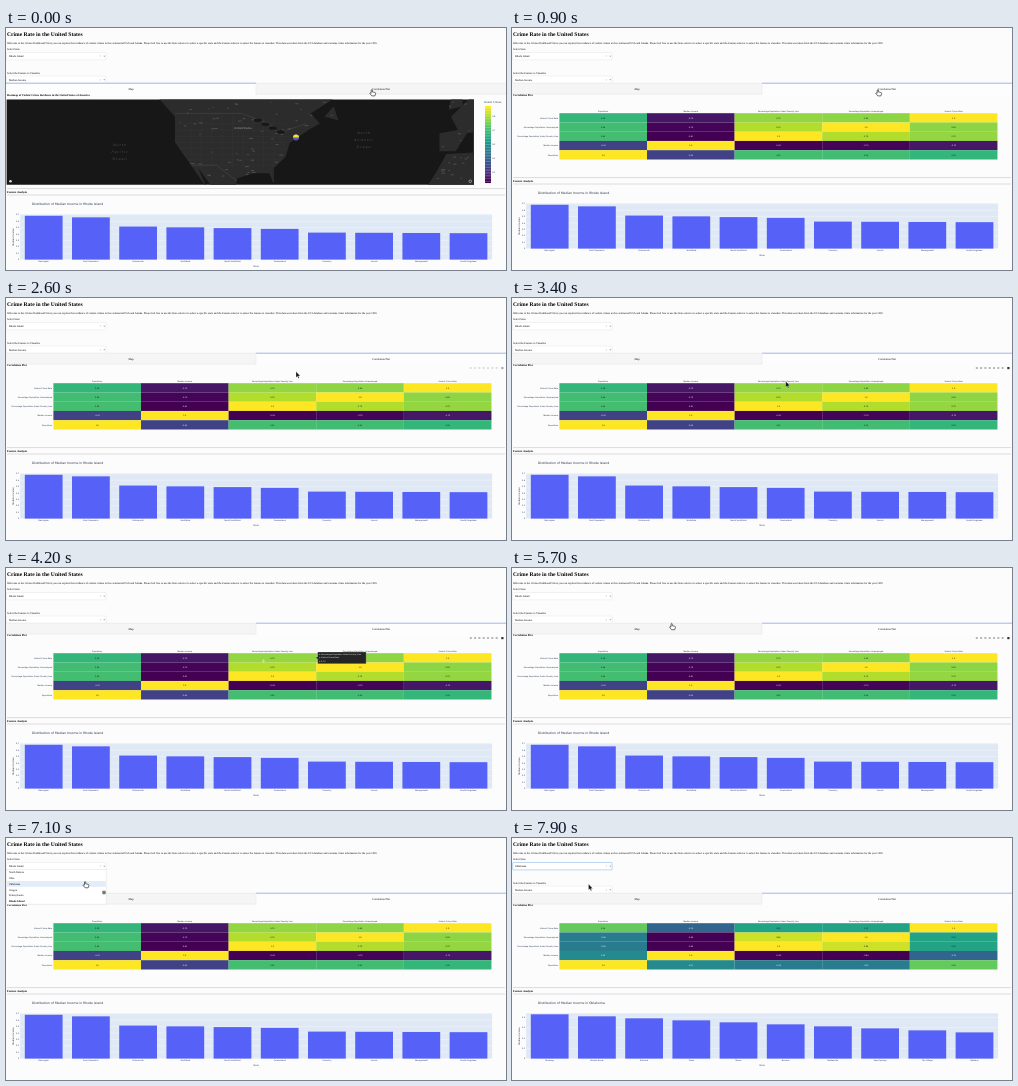
These frames come from a looping animation (500x242 px, 8000 ms). An HTML page:

```html
<!DOCTYPE html>
<html lang="en">
<head>
<meta charset="utf-8">
<title>Crime dashboard</title>
<style>
  html, body { margin: 0; width: 100%; height: 100%; overflow: hidden; background: #fcfcfc; }
  svg { display: block; width: 100vw; height: 100vh; text-rendering: geometricPrecision; }
  .serif { font-family: "Liberation Serif", serif; }
  .sans { font-family: "DejaVu Sans", sans-serif; }
</style>
</head>
<body>
<svg id="stage" viewBox="0 0 500 242"></svg>
<script>
const LOOP = 8000;
const INK = '#1f2d47';
const MID = 'text-anchor="middle"', END = 'text-anchor="end"', BOLD = 'font-weight="bold"';
const stage = document.getElementById('stage');

// Markup helpers; text is placed by its vertical middle.
const text = (s, x, y, size, family, attrs = '') =>
  `<text class="${family}" x="${x}" y="${y + size * 0.35}" font-size="${size}" ${attrs}>${s}</text>`;
const serif = (s, x, y, size = 2.73, attrs) => text(s, x, y, size, 'serif', attrs);
const sans = (s, x, y, size = 1.95, attrs) => text(s, x, y, size, 'sans', attrs);
const heading = (s, y) => serif(s, 1, y, 2.84, BOLD);
const rect = (x, y, w, h, fill, attrs = '') =>
  `<rect x="${x}" y="${y}" width="${w}" height="${h}" fill="${fill}" ${attrs}/>`;
const line = (x1, y1, x2, y2, color, width = 0.4) =>
  `<path d="M${x1} ${y1}L${x2} ${y2}" stroke="${color}" stroke-width="${width}"/>`;
const group = (id, body, attrs = '') => `<g id="${id}" ${attrs}>${body}</g>`;
const repeat = (n, draw) => Array.from({ length: n }, (_, i) => draw(i)).join('');
const clamp = v => Math.min(Math.max(v, 0), 1);

const viridisStops = ['440154', '482878', '3e4989', '31688e', '26828e', '1f9e89', '35b779', '6ece58', 'b5de2b', 'fde725'];
function viridis(t) {
  const p = clamp(t) * 9, i = Math.min(Math.floor(p), 8);
  const channel = (hex, k) => parseInt(hex.substr(k * 2, 2), 16);
  return `rgb(${[0, 1, 2].map(k => {
    const a = channel(viridisStops[i], k), b = channel(viridisStops[i + 1], k);
    return Math.round(a + (b - a) * (p - i));
  })})`;
}

const features = ['Population', 'Median Income', 'Percentage Population Under Poverty Line',
  'Percentage Population Unemployed', 'Violent Crime Rate'];
// "hardship" holds each feature's loading on one shared factor; "urban" links population and crime.
const states = {
  'Rhode Island': {
    hardship: [0.5, -0.9, 0.9, 0.88, 0.78], urban: 0,
    cities: ['Barrington', 'East Greenwich', 'Portsmouth', 'Smithfield', 'North Smithfield',
      'Cumberland', 'Coventry', 'Lincoln', 'Narragansett', 'South Kingstown'],
    income: i => i < 2 ? 0.685 - 0.025 * i : i < 6 ? 0.54 - 0.012 * i : 0.44 - 0.003 * i,
    unit: 64, ticks: 7
  },
  'Oklahoma': {
    hardship: [-0.06, -0.9, 0.93, 0.93, 0.25], urban: 0.58,
    cities: ['Mustang', 'Broken Arrow', 'Edmond', 'Yukon', 'Moore',
      'Norman', 'Bartlesville', 'Sand Springs', 'The Village', 'Bethany'],
    income: i => 0.43 - 0.0195 * i,
    unit: 103, ticks: 4
  }
};
function correlation(state, a, b) {
  const { hardship, urban } = states[state];
  return a === b ? 1 : hardship[a] * hardship[b] + (a + b === 4 && a * b === 0 ? urban : 0);
}

const GRID = { x: 47.4, y: 85.2, w: 87.6, h: 9.25 };
function heatmap(state) {
  return repeat(5, i => {
    const y = GRID.y + i * GRID.h, cx = GRID.x + (i + 0.5) * GRID.w;
    return sans(features[i], cx, 83.2, 1.95, `${MID} fill="${INK}"`) +
      sans(features[4 - i], 46.2, y + GRID.h / 2, 1.95, `${END} fill="${INK}"`) +
      repeat(5, j => {
        const v = correlation(state, 4 - i, j), x = GRID.x + j * GRID.w;
        return rect(x, y, GRID.w + 0.05, GRID.h + 0.05, viridis((v + 0.81) / 1.81)) +
          sans(v === 1 ? '1.0' : v.toFixed(2), x + GRID.w / 2, y + GRID.h / 2, 1.95,
            `${MID} fill="${v < 0.1 ? '#fff' : '#111'}"`);
      });
  });
}

function barChart(state) {
  const { cities, income, unit, ticks } = states[state];
  const left = 14.1, step = 47.2, base = 220.6;
  return sans(`Distribution of Median Income in ${state}`, 26, 165.4, 3.08, `fill="${INK}"`) +
    rect(left, 175.3, step * 10, base - 175.3, '#dfe8f5') +
    repeat(ticks + 1, k => {
      const y = base - k * 0.1 * unit;
      return line(left, y, left + step * 10, y, '#fff', 0.3) +
        sans((k / 10).toString(), 13.2, y, 1.95, `${END} fill="${INK}"`);
    }) +
    cities.map((city, i) => {
      const h = income(i) * unit;
      return rect(left + step * (i + 0.1), base - h, step * 0.8, h, '#5561f7') +
        sans(city, left + step * (i + 0.5), 222.7, 1.95, `${MID} fill="${INK}"`);
    }).join('') +
    sans('State', 250, 227, 2.1, `${MID} fill="${INK}"`) +
    sans('Median Income', 0, 0, 2.3, `${MID} fill="${INK}" transform="translate(7.5 198) rotate(-90)"`);
}

// Rough coastlines as longitude,latitude pairs, projected with Mercator around the marker.
const MARK = { x: 290, y: 109.6, lon: -71.4, lat: 41.6, scale: 2.3 };
const mercator = lat => Math.log(Math.tan(Math.PI / 4 + lat * Math.PI / 360)) * 180 / Math.PI;
const project = (lon, lat) => [MARK.x + MARK.scale * (lon - MARK.lon),
  MARK.y - MARK.scale * (mercator(lat) - mercator(MARK.lat))];
const trace = coast => 'M' + coast.split(' ').map(p => project(...p.split(',').map(Number)).map(v => v.toFixed(1)).join(' ')).join('L');
const coasts = [
  '-131,53 -124,48 -124,40 -117,32 -110,23 -114,31 -105,20 -98,20 -97,27 -90,29 -83,29 -81,25 -81,31 -76,35 -74,40 -70,42 -66,44 -61,46 -65,49 -55,53',
  '-59,48 -53,47 -55,51',
  '-9,43 -1,44 -4,48 4,53 14,54 14,44 3,43 -2,37 -9,37',
  '-5,50 1,51 1,53 -4,53',
  '-6,36 14,37 14,20 -17,20 -10,30'
];
function mapView() {
  let seed = 7;
  const random = () => (seed = seed * 16807 % 2147483647) / 2147483647;
  const coastPath = coasts.map(c => trace(c) + 'Z').join('');
  const label = (word, x, y) => sans(word, x, y, 3.3, `${MID} font-style="italic" letter-spacing=".9" fill="#505050"`);
  const ocean = (name, x, y) => ['North', name, 'Ocean'].map((word, i) => label(word, x, y + i * 6.8)).join('');
  const stateLines = repeat(9, i => {
    const lon = -117 + i * 4.5, lat = 32 + i * 2;
    return trace(`${lon},31 ${lon},48.5`) + (i < 8 ? trace(`-123,${lat} -76,${lat}`) : '');
  }).replace(/,/g, '');
  const towns = repeat(170, () => {
    const x = 170 + random() * 300, y = 74 + random() * 80;
    return `M${x} ${y}h${1 + random() * 3}`;
  });
  return `<clipPath id="frame">${rect(0.6, 71.5, 467.3, 85.3, '#000')}</clipPath>` +
    `<clipPath id="coast"><path d="${coastPath}"/></clipPath><g clip-path="url(#frame)">` +
    rect(0, 71, 468, 86, '#171717') + `<path d="${coastPath}" fill="#2c2c2c"/>` +
    `<g clip-path="url(#coast)" fill="none"><path d="${stateLines}" stroke="#3c3c3c" stroke-width=".3"/>` +
    `<path d="${towns}" stroke="#6c6c6c" stroke-width=".5"/>` +
    `<path d="${trace('-124,49 -95,49 -83,46 -79,43 -67,46')}${trace('-117,32 -106,32 -97,26')}" stroke="#555" stroke-width=".4"/></g>` +
    repeat(4, i => {
      const [x, y] = project(-88 + i * 3.3, 47 - i * 1.2);
      return `<ellipse cx="${x}" cy="${y}" rx="4" ry="1.7" fill="#171717"/>`;
    }) +
    ocean('Pacific', 114, 117) + ocean('Atlantic', 358, 105) +
    sans('United States', 237, 100, 2.6, `${MID} fill="#aaa"`) +
    '<circle cx="4.5" cy="153.3" r="1.3" fill="#ddd"/><circle cx="464.3" cy="153.3" r="1.3" fill="none" stroke="#ccc" stroke-width=".6"/></g>' +
    `<g transform="translate(${MARK.x} ${MARK.y})"><circle r="3" fill="#5a55b4"/><path d="M-3 0a3 3 0 0 1 6 0z" fill="#f4e32a"/></g>` +
    repeat(50, i => rect(479, 78 + i * 1.54, 6, 1.6, viridis(1 - i / 49))) +
    repeat(5, i => sans((0.8 - i * 0.15).toFixed(1), 486.2, 88 + i * 14, 1.95, `fill="${INK}"`)) +
    sans('Violent Crimes', 478, 74.6, 2.4, `fill="${INK}"`);
}

const control = (y, id) =>
  rect(0.6, y, 99.5, 7.4, '#fff', `id="${id}" stroke="#ddd" stroke-width=".4" rx=".6"`) +
  serif('×', 94.3, y + 3.7, 3.2, `${MID} fill="#888"`) +
  `<path d="M97.3 ${y + 3.3}h2l-1 1.2z" fill="#999"/>`;

const tabs = active => ['Map', 'Correlation Plot'].map((label, i) => {
  const x = i * 250, on = i === active;
  return rect(x, 55, 250, 11.2, on ? '#fdfdfd' : '#f5f5f5') +
    line(x, 55.2, x + 250, 55.2, on ? '#5f86e0' : '#ddd', on ? 0.6 : 0.4) +
    (on ? '' : line(x, 66.1, x + 250, 66.1, '#ddd')) +
    serif(label, x + 125, 60.7, 2.8, MID);
}).join('') + line(250, 55, 250, 66.2, '#ddd');

const options = ['North Dakota', 'Ohio', 'Oklahoma', 'Oregon', 'Pennsylvania', 'Rhode Island'];
const MENU = { y: 31.4, row: 5.8 };
const menu = rect(0.6, MENU.y, 99.5, 34.7, '#fff', 'stroke="#ddd" stroke-width=".4"') +
  rect(0.8, 0, 99.1, MENU.row, '#e3edfa', 'id="focusRow"') +
  options.map((o, i) => serif(o, 3, MENU.y + (i + 0.5) * MENU.row, 2.73, i === 5 ? BOLD : '')).join('') +
  '<circle cx="98" cy="54.5" r="1.9" fill="#7a7a7a"/>';

const icons = repeat(7, i => rect(463.8 + i * 4.3, 69.1, 2, 2, '#b4b4b4', 'rx=".5"')) + rect(495.3, 69, 2.2, 2.2, '#333');

stage.innerHTML =
  serif('Crime Rate in the United States', 1, 6.5, 5.57, BOLD) +
  serif('Welcome to the Crimes Dashboard! Here you can explore the incidence of violent crimes in the continental USA and Alaska. ' +
    'Please feel free to use the State selector to select a specific state and the Feature selector to select the feature to visualize. ' +
    'This data was taken from the UCI database and contains crime information for the year 1995', 1, 15.2) +
  serif('Select State', 1, 21) + control(24.5, 'stateBox') + group('stateName', '') +
  serif('Select the Feature to Visualize', 1, 45) + control(48, 'featureBox') + serif('Median Income', 3, 51.8) +
  group('mapTab', tabs(0) + heading('Heatmap of Violent Crime Incidence in the United States of America', 66.8) + mapView()) +
  group('plotTab', tabs(1) + heading('Correlation Plot', 66.8) + group('heat', '') + group('modebar', icons)) +
  group('analysis', line(1, 149.6, 499, 149.6, '#aaa') + line(1, 156, 499, 156, '#aaa') +
    heading('Feature Analysis', 152.6) + group('bars', '')) +
  group('tip', '') + group('menu', menu) +
  group('cursor',
    '<path id="arrow" d="M0 0V6L1.4 4.8 2.3 6.8 3.3 6.4 2.4 4.4H4.2Z" fill="#111" stroke="#fff" stroke-width=".3"/>' +
    '<path id="hand" d="M0 .5Q.6-.5 1.2 .5V2.4L3.9 3Q4.6 3.3 4.4 4.2L3.7 6.4H.6L-1.5 3.8Q-1.4 2.9 0 3.7Z" fill="#fff" stroke="#111" stroke-width=".6"/>' +
    '<path id="cross" d="M-2 0H2M0-2V2" stroke="#d8d8d8" stroke-width=".8"/>');

const el = {};
stage.querySelectorAll('[id]').forEach(node => el[node.id] = node);
const show = (node, on) => node.style.display = on ? '' : 'none';

// Each move eases the cursor to a new place between two times.
const moves = [
  { from: 1800, to: 2600, x: 290, y: 73.5 },
  { from: 2600, to: 4200, x: 257.5, y: 93 },
  { from: 4200, to: 5700, x: 159, y: 55.3 },
  { from: 5700, to: 6200, x: 84, y: 27.5 },
  { from: 6400, to: 7000, x: 78.5, y: 43.4 },
  { from: 7400, to: 7900, x: 76.5, y: 46 }
];
function cursorAt(t) {
  let x = 365.2, y = 61.5;
  for (const m of moves) {
    const u = clamp((t - m.from) / (m.to - m.from)), e = u * u * (3 - 2 * u);
    x += (m.x - x) * e;
    y += (m.y - y) * e;
  }
  return [x, y];
}

function hoverLabel(state, col, row) {
  const x = GRID.x + (col + 1) * GRID.w + 0.8, y = GRID.y + (row + 0.5) * GRID.h;
  const lines = [`x: ${features[col]}`, `y: ${features[4 - row]}`, `z: ${correlation(state, 4 - row, col).toFixed(2)}`];
  const w = Math.max(...lines.map(s => s.length)) * 1.08 + 2;
  return `<path d="M${x - 1.5} ${y}l2.2-1.2v-4.6h${w}v11.6h${-w}v-4.6z" fill="#252525" stroke="#fff" stroke-width=".2"/>` +
    lines.map((s, i) => sans(s, x + 1.9, y + (i - 1) * 3.5, 1.9, 'fill="#fff"')).join('');
}

let drawnState;
function render(time) {
  const t = Math.floor(time % LOOP / 100) * 100;
  const onMap = t < 900, menuOpen = t >= 6300 && t < 7200;
  const chartState = t < 7600 ? 'Rhode Island' : 'Oklahoma';
  if (chartState !== drawnState) {
    el.heat.innerHTML = heatmap(chartState);
    el.bars.innerHTML = barChart(chartState);
    drawnState = chartState;
  }
  show(el.mapTab, onMap);
  show(el.plotTab, !onMap);
  el.analysis.setAttribute('transform', `translate(0 ${onMap ? 11 : 0})`);
  el.stateName.innerHTML = serif(t < 7200 ? 'Rhode Island' : 'Oklahoma', 3, 28.3);
  el.stateBox.setAttribute('stroke', t < 7200 ? '#ddd' : '#5b9be0');

  const [x, y] = cursorAt(t);
  const col = Math.floor((x - GRID.x) / GRID.w), row = Math.floor((y - GRID.y) / GRID.h);
  const inHeat = !onMap && !menuOpen && col >= 0 && col < 5 && row >= 0 && row < 5;
  const clickable = menuOpen || (y >= 54.5 && y < 66.5) || (x < 101 && y > 24 && y < 32);
  show(el.hand, clickable);
  show(el.cross, inHeat);
  show(el.arrow, !clickable && !inHeat);
  el.cursor.setAttribute('transform', `translate(${x} ${y})`);
  el.tip.innerHTML = inHeat ? hoverLabel(chartState, col, row) : '';

  el.modebar.style.opacity = clamp(t < 4000 ? (t - 2400) / 500 : (6100 - t) / 300);
  show(el.menu, menuOpen);
  const focus = Math.floor((y + 0.6 - MENU.y) / MENU.row);
  el.focusRow.setAttribute('y', MENU.y + (focus < 0 ? 5 : focus) * MENU.row);
}

const start = performance.now();
(function tick() {
  render(performance.now() - start);
  requestAnimationFrame(tick);
})();
</script>
</body>
</html>
```
